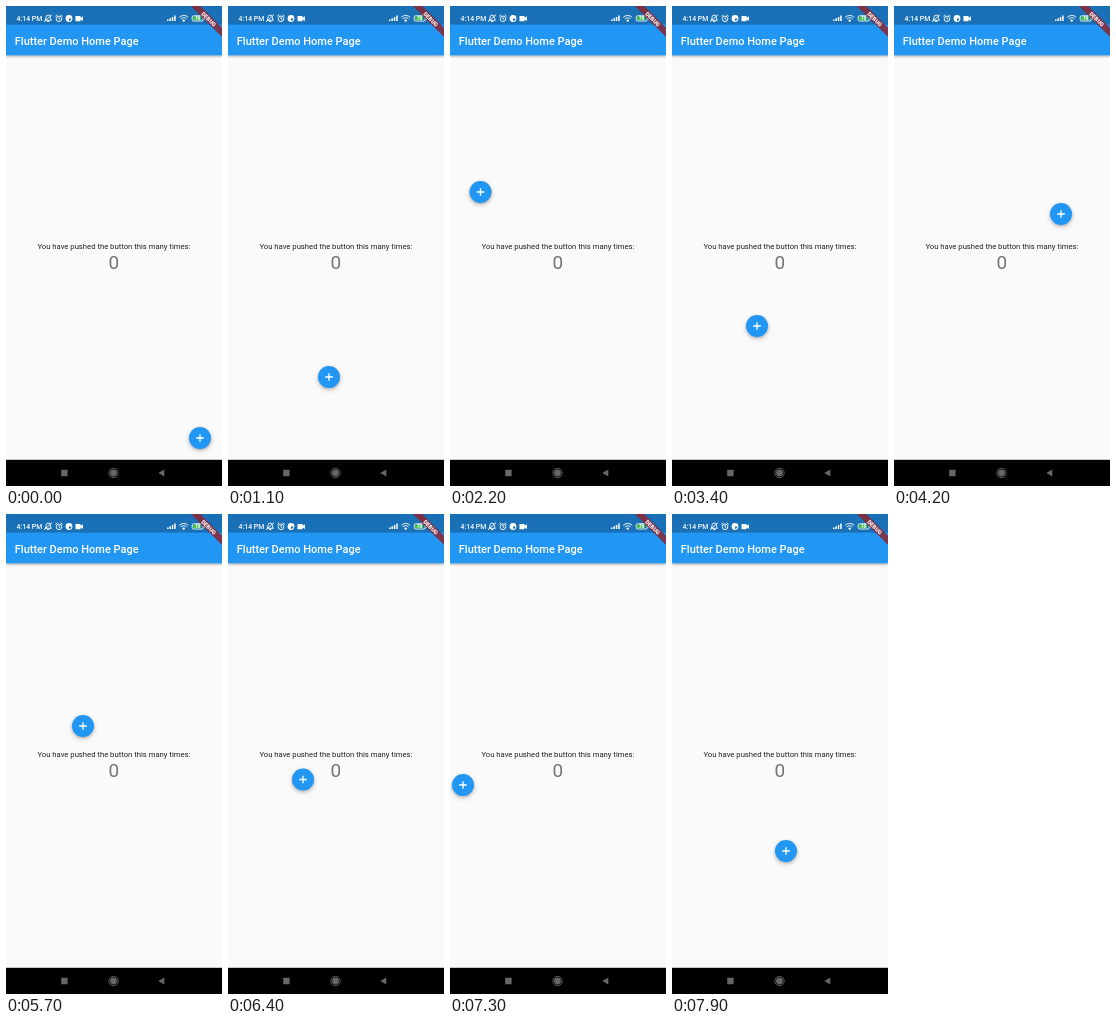
These frames come from a looping animation (216 by 480 pixels, 8000 ms). An HTML page:

```html
<!DOCTYPE html>
<html lang="en">
<head>
<meta charset="utf-8">
<title>Draggable button</title>
<style>
  html, body { margin: 0; width: 100%; height: 100%; overflow: hidden; background: #fafafa; }
  svg { display: block; width: 216px; height: 480px; font-family: Roboto, sans-serif; }
  .bar { filter: drop-shadow(0 1.1px 1.1px rgba(0, 0, 0, .2)) drop-shadow(0 1.2px 1.6px rgba(0, 0, 0, .14)); }
  #fab { filter: drop-shadow(0 1.7px 1.4px rgba(0, 0, 0, .2)) drop-shadow(0 2.4px 2.7px rgba(0, 0, 0, .16)); }
  .line { fill: none; stroke: #fff; stroke-width: .9; }
</style>
</head>
<body>
<svg viewBox="0 0 216 480">
  <rect width="216" height="480" fill="#fafafa"/>
  <rect class="bar" width="216" height="49.3" fill="#2196f3"/>
  <rect width="216" height="18.6" fill="#1970b6"/>
  <text x="8.8" y="38.5" font-size="11" font-weight="500" fill="#fff">Flutter Demo Home Page</text>

  <!-- status bar -->
  <g fill="#fff">
    <text x="10.5" y="15" font-size="6.9" font-weight="500">4:14 PM</text>
    <path class="line" d="M39 14.3q1-1 1-3a2.2 2.2 0 0 1 4.4 0q0 2 1 3zM41 15.5h2.4M38 15.8l8-7.2"/>
    <circle class="line" cx="53" cy="12.8" r="2.8"/>
    <path class="line" d="M53 11v2l1.3.8M49.4 10.3l1.9-1.6M56.6 10.3l-1.9-1.6"/>
    <circle cx="63" cy="12.5" r="3.4"/>
    <path d="M63 12.5h2.4a2.4 2.4 0 0 1-2.4 2.4z" fill="#1970b6"/>
    <path d="M69.5 10h5v1.7l2.4-1.5v4.8l-2.4-1.5v1.7h-5z"/>
    <path d="M161 13.4h1.5V15H161zM163.4 12.2h1.5V15h-1.5zM165.8 11h1.5v4h-1.5zM168.2 9.6h1.5V15h-1.5z"/>
    <path class="line" d="M173.2 11.3a6.4 6.4 0 0 1 9 0M174.8 13a4 4 0 0 1 5.8 0"/>
    <circle cx="177.7" cy="14.6" r="1.2"/>
    <rect class="line" x="186.2" y="9.8" width="11" height="5.2" rx="1.4"/>
    <rect x="198" y="11.4" width="1" height="2.2"/>
    <rect x="187" y="10.5" width="8" height="3.8" rx=".7" fill="#43c04b"/>
    <text x="191.6" y="14.1" font-size="4.6" font-weight="700" text-anchor="middle">78</text>
  </g>

  <!-- page content -->
  <g text-anchor="middle">
    <text x="107.9" y="243.4" font-size="7.7" fill="#212121">You have pushed the button this many times:</text>
    <text x="107.7" y="263.4" font-size="18.9" fill="#757575">0</text>
  </g>

  <!-- navigation bar -->
  <rect y="453.8" width="216" height="27"/>
  <g fill="#666">
    <rect x="55.2" y="463.8" width="6.4" height="6.4" rx=".5"/>
    <circle cx="107.5" cy="467" r="3.4"/>
    <circle cx="107.5" cy="467" r="4.7" fill="none" stroke="#666" stroke-width=".9"/>
    <path d="M152.3 467l6-3.5v7z"/>
  </g>

  <g id="fab">
    <circle r="11" fill="#2196f3"/>
    <path d="M-3.8 0h7.6M0-3.8v7.6" stroke="#fff" stroke-width="1.3"/>
  </g>

  <!-- debug ribbon -->
  <g transform="translate(216 0) rotate(45)">
    <rect x="-32" y="15.4" width="64" height="6.6" fill="#8b2633" fill-opacity=".85"/>
    <text y="20.7" font-size="5.6" font-weight="900" fill="#fff" text-anchor="middle">DEBUG</text>
  </g>
</svg>
<script>
const LOOP = 8000, STEP = 100, SNAP = 600;
const fab = document.getElementById("fab");

// Each drag passes its points at an even pace; on release
// the button slides to rest, where the next drag picks it up.
const drags = [
  { start: 700, pace: 400, points: [[194, 432], [101, 371], [70, 319], [83, 186]] },
  { start: 3000, pace: 400, points: [[13, 186], [85, 320], [138, 271], [167, 208]] },
  { start: 5000, pace: 350, points: [[203, 201], [128, 286], [77, 212], [145, 180], [75, 265.5]] },
  { start: 7300, pace: 600, points: [[13, 271], [114, 337]] }
];

const clamp = (v, low, high) => Math.min(high, Math.max(low, v));

// Catmull-Rom curve through the points, s counted in points
function curve(points, s) {
  const last = points.length - 1;
  const i = Math.min(Math.floor(s), last - 1), u = s - i;
  const [a, b, c, d] = [-1, 0, 1, 2].map(k => points[clamp(i + k, 0, last)]);
  return [0, 1].map(k => b[k] + u / 2 * (c[k] - a[k]
    + u * (2 * a[k] - 5 * b[k] + 4 * c[k] - d[k]
    + u * (3 * (b[k] - c[k]) + d[k] - a[k]))));
}

function place(time) {
  const i = Math.max(0, drags.findLastIndex(drag => drag.start <= time));
  const { start, pace, points } = drags[i];
  const last = points.length - 1;
  const [x, y] = curve(points, clamp((time - start) / pace, 0, last));
  const [restX, restY] = drags[(i + 1) % drags.length].points[0];
  const left = (1 - clamp((time - start - last * pace) / SNAP, 0, 1)) ** 2;
  return [restX + (x - restX) * left, restY + (y - restY) * left];
}

function draw() {
  const time = Math.floor(performance.now() % LOOP / STEP) * STEP;
  fab.setAttribute("transform", `translate(${place(time)})`);
  requestAnimationFrame(draw);
}
draw();
</script>
</body>
</html>
```
